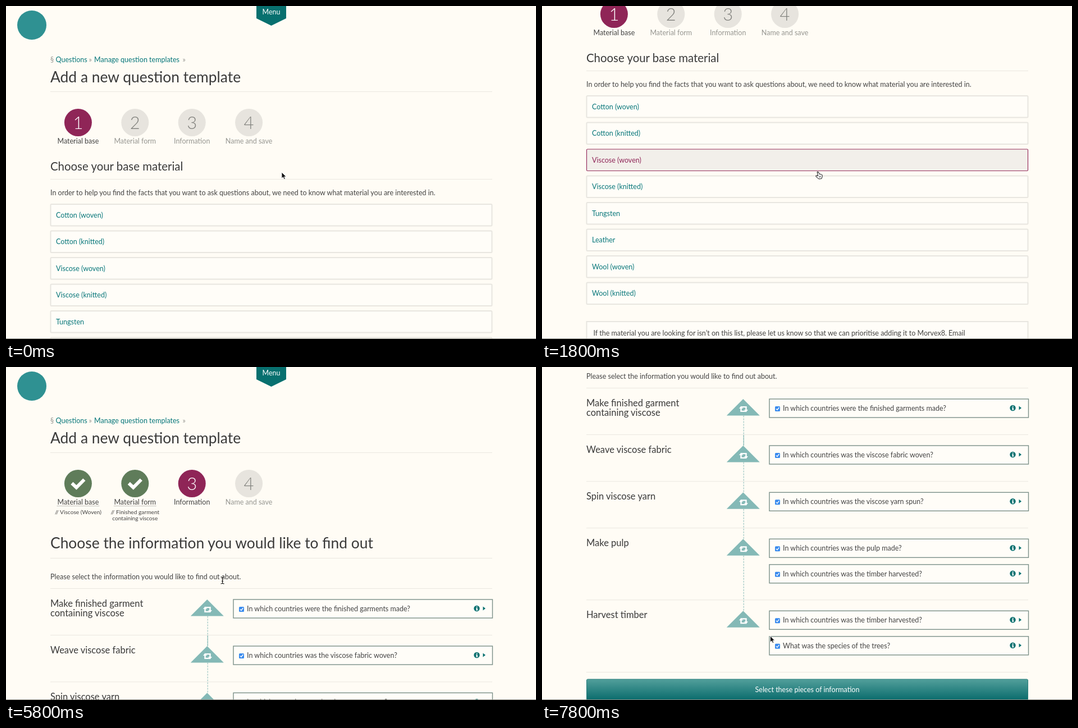
An HTML page for the animation above (8 s loop, 944 px wide and 593 px high).

```html
<!DOCTYPE html>
<html lang="en">
<head>
<meta charset="utf-8">
<title>Question template wizard</title>
<style>
  html, body { margin: 0; width: 100%; height: 100%; overflow: hidden; background: #fffcf5; }
  svg { display: block; }
  text { font: 12.52px Lato, "Open Sans", sans-serif; fill: #444; }
  text.h1 { font-size: 26.4px; fill: #3a3a3a; }
  text.h2 { font-size: 20.4px; fill: #3a3a3a; }
  text.h3 { font-size: 16.5px; fill: #3a3a3a; }
  text.num { font-size: 31px; font-weight: 300; fill: #80807c; }
  text.small { font-size: 10.2px; fill: #444; }
  text.mid { text-anchor: middle; }
  text.link { fill: #08777a; }
  text.grey { fill: #969691; }
  text.white { fill: #fff; }
  text.red { fill: #c23b2a; }
  .rule { stroke: #eae7e0; }
  .row rect { fill: #fffdf8; stroke: #e8e6e0; stroke-width: 2; }
  .row.on rect { fill: #f2efea; stroke: #97305f; stroke-width: 1.2; }
  .row.on text { fill: #8f2557; }
</style>
</head>
<body>
<svg id="stage" width="944" height="593" viewBox="0 0 944 593"></svg>
<script>
const TEAL = '#08706f', PALE = '#84b9b6', PLUM = '#8f2557';

const text = (x, y, s, cls = '') => `<text x="${x}" y="${y}" class="${cls}">${s}</text>`;
const rule = y => `<path class="rule" d="M79 ${y}H866"/>`;

const header = `
  <circle cx="46" cy="34" r="26" fill="#2f9192"/>
  <path d="M446 0H499V22L472.5 35L446 22Z" fill="${TEAL}"/>
  ${text(472.5, 15, 'Menu', 'mid white')}
  ${text(79, 100, '§', 'grey')}${text(88.5, 100, 'Questions', 'link')}
  ${text(147.5, 100, '»', 'grey')}${text(157, 100, 'Manage question templates', 'link')}
  ${text(314.5, 100, '»', 'grey')}
  ${text(79, 136, 'Add a new question template', 'h1')}${rule(152.5)}`;

// Progress circles; notes holds the lines under each finished step
function steps(current, notes = []) {
  return ['Material base', 'Material form', 'Information', 'Name and save'].map((name, i) => {
    const x = 128.4 + i * 101.4, done = i < current, active = i === current;
    const fill = done ? '#5f7c5a' : active ? PLUM : '#e7e4de';
    const inside = done
      ? `<path d="M${x - 11} 207l8 7.500l14-14" fill="none" stroke="#fff" stroke-width="6"/>
         <path d="M${x - 37.5} 247.500h75" stroke="#888" stroke-dasharray="1 1"/>`
      : text(x, 218.5, i + 1, 'num mid' + (active ? ' white' : ''));
    const lines = (notes[i] || []).map((s, k) => text(x, 262 + k * 11, s, 'small mid')).join('');
    return `<circle cx="${x}" cy="207.5" r="24.5" fill="${fill}"/>${inside}
      ${text(x, 244.7, name, 'mid' + (done || active ? '' : ' grey'))}${lines}`;
  }).join('');
}

const choices = (top, names) => names.map((name, i) => {
  const y = top + i * 47.5;
  return `<g class="row"><rect x="79.5" y="${y}" width="786" height="38.5" rx="1.5"/>
    ${text(89, y + 23.5, name, 'link')}</g>`;
}).join('');

const pageA = header + steps(0) + text(79, 293, 'Choose your base material', 'h2') + rule(308.5) +
  text(79, 337, 'In order to help you find the facts that you want to ask questions about, we need to know what material you are interested in.') +
  choices(353, ['Cotton (woven)', 'Cotton (knitted)', 'Viscose (woven)', 'Viscose (knitted)',
    'Tungsten', 'Leather', 'Wool (woven)', 'Wool (knitted)']) +
  `<g class="row"><rect x="79.5" y="755" width="786" height="70"/></g>` +
  text(91.5, 779.5, 'If the material you are looking for isn’t on this list, please let us know so that we can prioritise adding it to Morvex8. Email');

const note = ['// Viscose (Woven)'];
const pageB = header + steps(1, [note]) + text(79, 307.5, 'Choose the form of your viscose', 'h2') + rule(322.5) +
  text(79, 351.5, 'To ask the right questions to find your answers, we need to know what form your viscose is in.') +
  choices(367.5, ['Finished garment containing viscose', 'Viscose fabric', 'Viscose yarn']) +
  `<path d="M0 560.5H944" stroke="#dedbd4" stroke-width="2"/>
   <path d="M366 581h8v5.500h-8zM367.800 581v-1.500a2.200 2.500 0 0 1 4.400 0v1.500" fill="#c23b2a"/>
   <path d="M369 581v-1.500a1 1.200 0 0 1 2 0v1.500z" fill="#fffcf5"/>` +
  text(379, 586, 'Your data is confidential and secure.', 'red');

const question = (y, s) => `
  <rect x="405" y="${y}" width="461.500" height="33" fill="#fffdf8" stroke="#7b9089" stroke-width="1.4"/>
  <rect x="415" y="${y + 13}" width="9" height="9" rx="1.5" fill="#3a8bee"/>
  <path d="M417 ${y + 17.5}l2 2l3.300-4.500" fill="none" stroke="#fff" stroke-width="1.4"/>
  ${text(429, y + 21, s)}
  <circle cx="838.5" cy="${y + 16}" r="5.2" fill="${TEAL}"/>
  <path d="M837.700 ${y + 12.5}h2v1.600h-2zM837 ${y + 15}h2.700v3.300h.8v1.200h-3.500v-1.200h.8v-2h-.8z" fill="#fff"/>
  <path d="M849.500 ${y + 12.5}l4.500 3.500l-4.500 3.500z" fill="${TEAL}"/>`;

const loopIcon = y => `<g transform="translate(359 ${y})" fill="#fff">
  <path d="M-8-1L-4.500-5.500L-1-1H-3.300V2.800H2.500L4.300 5H-5.700V-1Z"/>
  <path d="M8 1L4.500 5.500L1 1H3.300V-2.800H-2.500L-4.300-5H5.700V1Z"/></g>`;

const sections = [
  [394.5, ['Make finished garment', 'containing viscose'], ['In which countries were the finished garments made?']],
  [477.5, ['Weave viscose fabric'], ['In which countries was the viscose fabric woven?']],
  [560.8, ['Spin viscose yarn'], ['In which countries was the viscose yarn spun?']],
  [643.8, ['Make pulp'], ['In which countries was the pulp made?', 'In which countries was the timber harvested?']],
  [771.8, ['Harvest timber'], ['In which countries was the timber harvested?', 'What was the species of the trees?']]
];
const chain = sections.map(([y, title, asks], i) => {
  const next = sections[i + 1];
  const link = next ? `<path d="M359.200 ${y + 49}V${next[0] + 20}" stroke="${PALE}" stroke-dasharray="3 2"/>` : '';
  return rule(y) + link + (i ? '' : `<path d="M359.200 478V497" stroke="${PALE}"/>`) +
    `<path d="M358.300 ${y + 19.5}l29.500 29.500h-59z" fill="${PALE}"/>` + loopIcon(y + 37.5) +
    title.map((s, k) => text(79, y + 32.5 + k * 16.7, s, 'h3')).join('') +
    asks.map((s, k) => question(y + 19.5 + k * 45.5, s)).join('');
}).join('');

const pageC = header + steps(2, [note, ['// Finished garment', 'containing viscose']]) +
  text(79, 323, 'Choose the information you would like to find out', 'h1') + rule(340.5) +
  text(79, 378, 'Please select the information you would like to find out about.') + chain + rule(900.5) +
  `<linearGradient id="btn" x2="0" y2="1"><stop stop-color="#529f9b"/><stop offset="1" stop-color="#086a6b"/></linearGradient>
   <rect x="79.500" y="913" width="786" height="38" rx="2" fill="url(#btn)" stroke="#2c7f7d"/>` +
  text(472.5, 936, 'Select these pieces of information', 'mid white');

const pointers = {
  arrow: `<path d="M0 0V11L2.600 8.700L4.400 12.500L6.300 11.700L4.600 8H8Z" fill="#111" stroke="#fff" stroke-width=".8"/>`,
  hand: `<path d="M-1.500 1.200Q-2.500-.5-1-.6Q.2-.6 1.200 1.300L2.500 3.600Q5.200 3 7 5Q8 8.500 5.800 11.500L1.500 12Q-1.500 10.500-4 7.500Q-4.500 5.500-2.500 6L-.3 6.800Z" fill="#fff" stroke="#222" stroke-width="1.1" stroke-linejoin="round"/>
    <path d="M2.300 6.500v3M4 6.300v3" stroke="#222" stroke-width=".8"/>`,
  beam: `<path d="M-3-6Q0-6 0-4.500Q0-6 3-6M0-5V5M-3 6Q0 6 0 4.500Q0 6 3 6M-1.500 1.500H1.500" fill="none" stroke="#222" stroke-width="1.2"/>`
};

const stage = document.getElementById('stage');
const group = (cls, body) => `<g class="${cls}">${body}</g>`;
stage.innerHTML = [pageA, pageB, pageC].map(p => group('page', p)).join('') +
  '<path d="M0 592.500H944" stroke="#8d8c84"/>' +
  group('cursor', Object.keys(pointers).map(k => group(k, pointers[k])).join(''));

const pages = [...stage.querySelectorAll('.page')];
const rows = pages.map(p => [...p.querySelectorAll('.row')]);
const cursor = stage.querySelector('.cursor');

// Linear interpolation through [time, ...values]
function track(keys, t) {
  let i = 0;
  while (i < keys.length - 2 && t > keys[i + 1][0]) i++;
  const a = keys[i], b = keys[i + 1];
  const k = Math.min(1, Math.max(0, (t - a[0]) / (b[0] - a[0])));
  return a.slice(1).map((v, n) => v + (b[n + 1] - v) * k);
}
// Last value whose start time has passed
const latest = (keys, t) => keys.filter(k => k[0] <= t).pop()[1];

const scrolls = [
  [[0, 0], [200, 8], [600, 70], [1000, 135], [1200, 170], [1400, 183], [1800, 193]],
  [[0, 0], [1, 0]],
  [[5800, 0], [6000, 16], [6400, 100], [7000, 244.7], [7400, 315], [7800, 357]]
];
const path = [[0, 491, 296], [1200, 492, 296], [2000, 492, 296], [2600, 486, 271], [3400, 486, 271],
  [4400, 420, 384], [4800, 420, 384], [5600, 386.5, 380], [7000, 380, 379.5], [7200, 381, 382], [7800, 406.5, 479]];
const shapes = [[0, 'arrow'], [400, 'hand'], [3600, 'arrow'], [4000, 'hand'], [5000, 'beam'], [7400, 'arrow']];
const hovers = [[0, -1], [600, 0], [1000, 1], [1400, 2], [3000, -1], [4200, 0]];
const shown = [[0, 0], [3000, 1], [4800, 2]];

function draw(now) {
  const t = Math.floor(now % 8000 / 200) * 200;
  const page = latest(shown, t), hover = latest(hovers, t), shape = latest(shapes, t);
  pages.forEach((p, i) => p.style.display = i === page ? '' : 'none');
  pages[page].setAttribute('transform', `translate(0 ${-track(scrolls[page], t)[0]})`);
  rows[page].forEach((r, i) => r.classList.toggle('on', i === hover));
  cursor.setAttribute('transform', `translate(${track(path, t)})`);
  for (const c of cursor.children) c.style.display = c.classList.contains(shape) ? '' : 'none';
}

let start;
function tick(now) {
  start ??= now;
  draw(now - start);
  requestAnimationFrame(tick);
}
draw(0);
requestAnimationFrame(tick);
</script>
</body>
</html>
```
